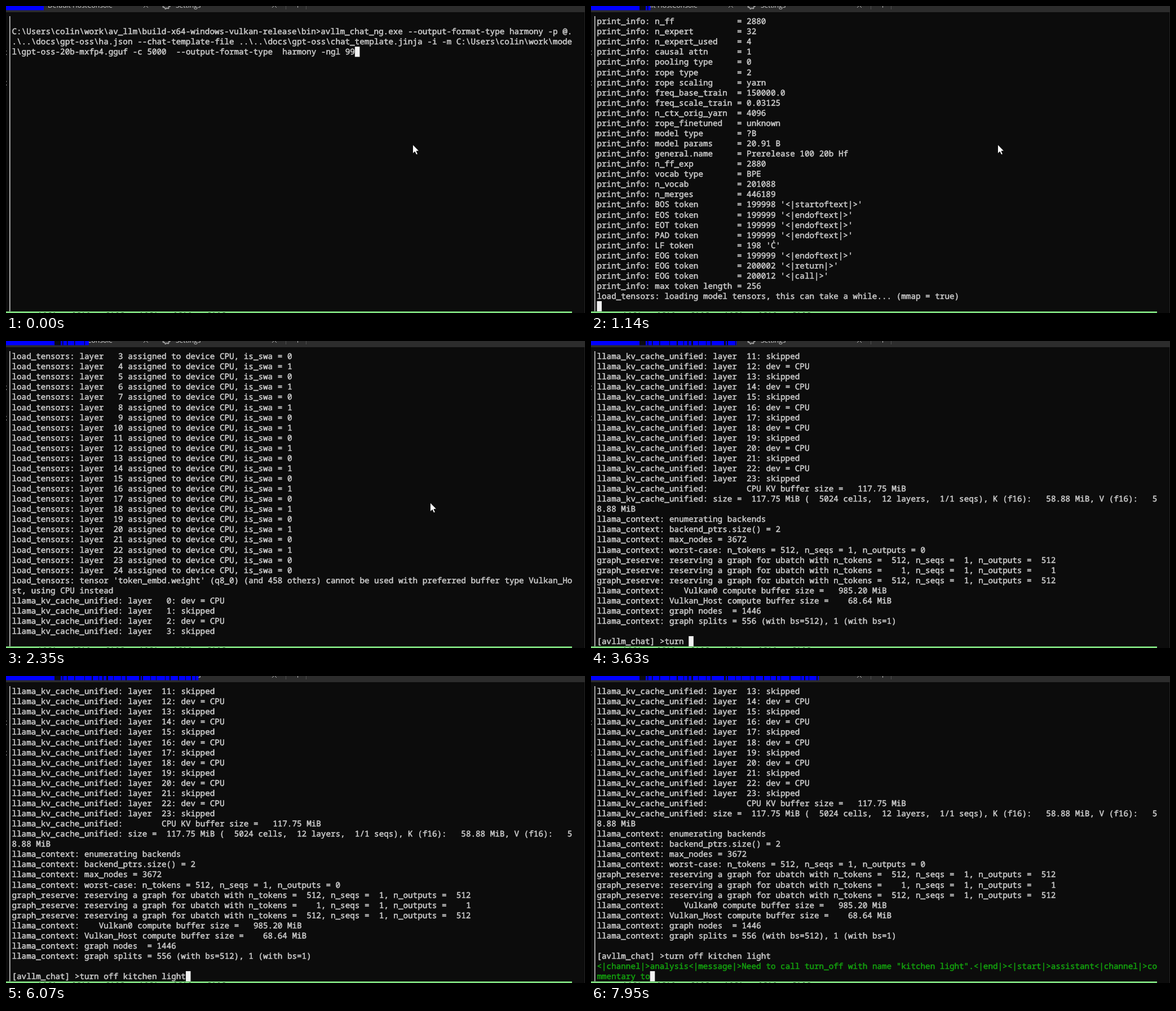
Recreate the animation shown at these times as an HTML page with a canvas. Size 1027 by 545 pixels, loop 8 s.

```html
<!DOCTYPE html>
<html lang="en">
<head>
<meta charset="utf-8">
<title>Terminal session</title>
<style>
  html, body { margin: 0; width: 100%; height: 100%; overflow: hidden; background: #0c0c0c; }
  canvas { display: block; width: 1027px; height: 545px; }
</style>
</head>
<body>
<canvas id="stage" width="1027" height="545"></canvas>
<script>
const ctx = document.getElementById('stage').getContext('2d');
const LOOP = 8000, COLS = 116, ROWS = 29;
const X0 = 10.5, CELL = 8.568, TOP = 18, LINE = 18.07;
const GREY = '#cccccc', GREEN = '#13a10e', BACK = '#0c0c0c';
const MONO = '500 14.28px "Noto Sans Mono", "DejaVu Sans Mono", monospace';

const wrap = s => s.match(new RegExp(`.{1,${COLS}}`, 'g')) || [''];
const count = (n, f) => Array.from({ length: n }, (_, i) => f(i));
const pad3 = n => String(n).padStart(3);

// ---- log text ----
const command = String.raw`C:\Users\colin\work\av_llm\build-x64-windows-vulkan-release\bin>avllm_chat_ng.exe --output-format-type harmony -p @..\..\docs\gpt-oss\ha.json --chat-template-file ..\..\docs\gpt-oss\chat_template.jinja -i -m C:\Users\colin\work\model\gpt-oss-20b-mxfp4.gguf -c 5000  --output-format-type  harmony -ngl 99`;

const kv = String.raw`general.architecture|str|gpt-oss
general.type|str|model
general.name|str|Prerelease 100 20b Hf
general.finetune|str|hf
general.basename|str|prerelease-100
general.size_label|str|20B
gpt-oss.block_count|u32|24
gpt-oss.context_length|u32|131072
gpt-oss.embedding_length|u32|2880
gpt-oss.feed_forward_length|u32|2880
gpt-oss.attention.head_count|u32|64
gpt-oss.attention.head_count_kv|u32|8
gpt-oss.rope.freq_base|f32|150000.000000
gpt-oss.attention.layer_norm_rms_epsilon|f32|0.000010
gpt-oss.expert_count|u32|32
gpt-oss.expert_used_count|u32|4
gpt-oss.attention.key_length|u32|64
gpt-oss.attention.value_length|u32|64
gpt-oss.attention.sliding_window|u32|128
gpt-oss.expert_feed_forward_length|u32|2880
gpt-oss.rope.scaling.type|str|yarn
gpt-oss.rope.scaling.factor|f32|32.000000
gpt-oss.rope.scaling.original_context_length|u32|4096
tokenizer.ggml.model|str|gpt2
tokenizer.ggml.pre|str|gpt-4o
tokenizer.ggml.tokens|arr[str,201088]|["!", "\"", "#", "$", "%", "&", "'", ...
tokenizer.ggml.token_type|arr[i32,201088]|[1, 1, 1, 1, 1, 1, 1, 1, 1, 1, 1, 1, ...`
  .split('\n').map((row, i) => {
    const [key, type, value] = row.split('|');
    return `llama_model_loader: - kv ${pad3(i)}: ${key.padStart(42)} ${type.padEnd(16)} = ${value}`;
  });

const info = `n_ff=2880
n_expert=32
n_expert_used=4
causal attn=1
pooling type=0
rope type=2
rope scaling=yarn
freq_base_train=150000.0
freq_scale_train=0.03125
n_ctx_orig_yarn=4096
rope_finetuned=unknown
model type=?B
model params=20.91 B
general.name=Prerelease 100 20b Hf
n_ff_exp=2880
vocab type=BPE
n_vocab=201088
n_merges=446189
BOS token=199998 '<|startoftext|>'
EOS token=199999 '<|endoftext|>'
EOT token=199999 '<|endoftext|>'
PAD token=199999 '<|endoftext|>'
LF token=198 'Ċ'
EOG token=199999 '<|endoftext|>'
EOG token=200002 '<|return|>'
EOG token=200012 '<|call|>'
max token length=256`.split('\n').map(row => {
  const [key, value] = row.split('=');
  return `print_info: ${key.padEnd(16)} = ${value}`;
});

const tensors = count(25, i =>
  `load_tensors: layer ${pad3(i)} assigned to device CPU, is_swa = ${i < 24 && i % 2 === 0 ? 1 : 0}`);
const cache = count(24, i =>
  `llama_kv_cache_unified: layer ${pad3(i)}: ${i % 2 ? 'skipped' : 'dev = CPU'}`);
const reserve = n =>
  `graph_reserve: reserving a graph for ubatch with n_tokens = ${String(n).padStart(4)}, n_seqs =  1, n_outputs = ${String(n).padStart(4)}`;

const log = [
  '', command, ...kv, ...info,
  'load_tensors: loading model tensors, this can take a while... (mmap = true)',
  ...tensors,
  "load_tensors: tensor 'token_embd.weight' (q8_0) (and 458 others) cannot be used with preferred buffer type Vulkan_Host, using CPU instead",
  ...cache,
  'llama_kv_cache_unified:        CPU KV buffer size =   117.75 MiB',
  'llama_kv_cache_unified: size =  117.75 MiB (  5024 cells,  12 layers,  1/1 seqs), K (f16):   58.88 MiB, V (f16):   58.88 MiB',
  'llama_context: enumerating backends',
  'llama_context: backend_ptrs.size() = 2',
  'llama_context: max_nodes = 3672',
  'llama_context: worst-case: n_tokens = 512, n_seqs = 1, n_outputs = 0',
  reserve(512), reserve(1), reserve(512),
  'llama_context:    Vulkan0 compute buffer size =   985.20 MiB',
  'llama_context: Vulkan_Host compute buffer size =    68.64 MiB',
  'llama_context: graph nodes  = 1446',
  'llama_context: graph splits = 556 (with bs=512), 1 (with bs=1)',
  ''
].flatMap(wrap);

// ---- timing ----
// [time, finished rows]
const output = [[0, 3], [565, 4], [630, 12], [690, 22], [750, 32], [820, 46], [880, 61],
  [1590, 88], [2280, 92], [2750, 100], [2820, 115], [2880, log.length]];
// [start, end, pieces]
const keys = [[3310, 3440, [...'tur']], [3510, 3580, [...'n ']], [3760, 4230, [...'off ']],
  [4400, 5050, [...'kitc']], [5230, 5930, [...'hen light']]];
const reply = [
  [6590, 6790, ['<|channel|>', 'analysis', '<|message|>', 'Need']],
  [6850, 7590, [' to', ' call', ' turn', '_off', ' with', ' name', ' "', 'k', 'itchen', ' light', '".', '<|end|>']],
  [7670, 7950, ['<|start|>', 'assistant', '<|channel|>', 'commentary', ' to']]
];
const ENTER = 6200;
// [start, end, steps] of screen refreshes
const refresh = [[80, 880, 13], [940, 1730, 13], [1790, 2350, 9], [2680, 3440, 13], [3510, 4300, 13],
  [4370, 5130, 12], [5190, 5930, 12], [6000, 6790, 13], [6850, 7590, 12], [7670, 7950, 5]];

const typed = (groups, t) => groups.map(([a, b, parts]) =>
  parts.filter((_, i) => t >= a + (b - a) * i / (parts.length - 1) - 0.5).join('')).join('');

function lastRefresh(t) {
  let last = 0;
  for (const [a, b, n] of refresh) {
    if (t < a) break;
    const gap = (b - a) / (n - 1);
    last = a + gap * Math.min(n - 1, Math.floor((t - a) / gap + 0.01));
  }
  return last;
}

function screen(t) {
  const done = output.filter(o => o[0] <= t).pop()[1];
  const rows = log.slice(0, done).map(s => [s, GREY]);
  let live = '', color = GREY, col = 0;
  if (done === 3) { live = log[3]; col = live.length; }
  else if (done === 32) live = log[32];
  else if (done === log.length) {
    live = '[avllm_chat] >' + typed(keys, t);
    if (t >= ENTER) {
      rows.push([live, GREY]);
      color = GREEN;
      const lines = wrap(typed(reply, t));
      live = lines.pop();
      lines.forEach(s => rows.push([s, GREEN]));
    }
    col = live.length;
  }
  rows.push([live, color]);
  return { rows: rows.slice(-ROWS), col };
}

// ---- drawing ----
function box(color, x, y, w, h) {
  ctx.fillStyle = color;
  ctx.fillRect(x, y, w, h);
}

function label(s, x, y, font, color) {
  ctx.font = font;
  ctx.fillStyle = color;
  ctx.fillText(s, x, y);
}

function stroke(color, width, ...points) {
  ctx.strokeStyle = color;
  ctx.lineWidth = width;
  ctx.beginPath();
  points.forEach(([x, y], i) => i ? ctx.lineTo(x, y) : ctx.moveTo(x, y));
  ctx.stroke();
}

function gear(x, y) {
  ctx.strokeStyle = '#c4c4c4';
  ctx.lineWidth = 1.2;
  ctx.beginPath();
  for (let i = 0; i <= 64; i++) {
    const a = i / 64 * Math.PI * 2, r = 6 + 0.9 * Math.sign(Math.sin(a * 8));
    ctx.lineTo(x + r * Math.cos(a), y + r * Math.sin(a));
  }
  ctx.stroke();
}

// dark marks inside the progress strip: [x, width]
const marks = [[86, 11], [100, 1.5], [108, 1.5], [121, 1.5], [139, 1], [152, 2], [164, 1], [171, 2],
  [178, 3], [190, 1], [204, 1], [212, 2], [236, 3], [241, 2], [256, 1], [266, 1], [282, 1], [290, 2],
  [305, 2], [318, 1], [328, 2], [336, 1], [352, 2], [372, 1], [378, 2], [386, 1], [400, 2]];

function header(t) {
  box('#2c2c2c', 0, 0, 1027, 11);
  const ui = '12px "Open Sans", "Noto Sans", sans-serif';
  label('Default HostConsole', 74, 2.5, ui, '#d0d0d0');
  label('Settings', 301, 2.5, ui, '#d0d0d0');
  for (const x of [248, 476]) {
    stroke('#b8b8b8', 1, [x - 4, 3], [x, -1], [x + 4, 3]);
  }
  gear(284.5, -1.5);
  stroke('#b8b8b8', 1, [517.5, 0], [517.5, 3]);
  stroke('#505050', 1, [496.5, 0], [496.5, 6]);
  stroke('#505050', 1, [532.5, 0], [532.5, 6]);

  const s = lastRefresh(t) / 1000;
  const end = s < 2.65 ? 67 + 34 * s : 260 + 33.4 * (s - 3.63);
  box('#0000ff', 0, 0, end, 7.5);
  for (const [x, w] of marks) {
    if (x < end) box('#0b0b12', x, 0, Math.min(w, end - x), 7.5);
  }
}

function frame() {
  stroke('#c8c8c8', 1.6, [6.8, 18], [6.8, 542]);
  label('x', -6.2, 86.5, MONO, '#a8a8a8');
  label('x', -6.2, 140.5, MONO, '#a8a8a8');
  box('#242424', 1026, 11, 1, 534);
  box('#84e584', 0, 542.3, 1004, 2.7);
  for (let i = 0; i < 42; i++) {
    if (i % 7 < 4) box('#2c5c2c', 59 + i * 8.57, 544, 2 + i % 3, 1);
  }
}

// a thin outline gives the semi-bold weight of the terminal face
function words(s, row, color) {
  ctx.font = MONO;
  ctx.fillStyle = ctx.strokeStyle = color;
  ctx.lineWidth = 0.55;
  ctx.lineJoin = 'round';
  const y = TOP + 14.2 + row * LINE;
  for (const m of s.matchAll(/\S+/g)) {
    const x = X0 + m.index * CELL;
    ctx.fillText(m[0], x, y);
    ctx.strokeText(m[0], x, y);
  }
}

function pointer(t) {
  if (t >= 3300) return;
  const u = Math.min(1, Math.max(0, (t - 1200) / 500)), e = u * u * (3 - 2 * u);
  const x = 721.5 + 31 * e, y = 246 + 41 * e;
  const shape = [[0, 0], [0, 16], [3.7, 12.6], [6.2, 18], [8.8, 16.9], [6.4, 11.6], [11, 11.2]];
  ctx.beginPath();
  shape.forEach(([dx, dy]) => ctx.lineTo(x + dx, y + dy));
  ctx.closePath();
  ctx.fillStyle = '#ffffff';
  ctx.fill();
  ctx.strokeStyle = '#000000';
  ctx.lineWidth = 0.8;
  ctx.stroke();
}

function draw(now) {
  const t = now % LOOP;
  ctx.textRendering = 'geometricPrecision';
  box(BACK, 0, 0, 1027, 545);
  header(t);
  frame();
  const { rows, col } = screen(t);
  rows.forEach(([s, color], i) => words(s, i, color));
  if (t < 1590 || t >= 2680) {
    box('#f2f2f2', X0 + col * CELL, TOP + (rows.length - 1) * LINE, CELL, LINE);
  }
  pointer(t);
  requestAnimationFrame(draw);
}
requestAnimationFrame(draw);
</script>
</body>
</html>
```
